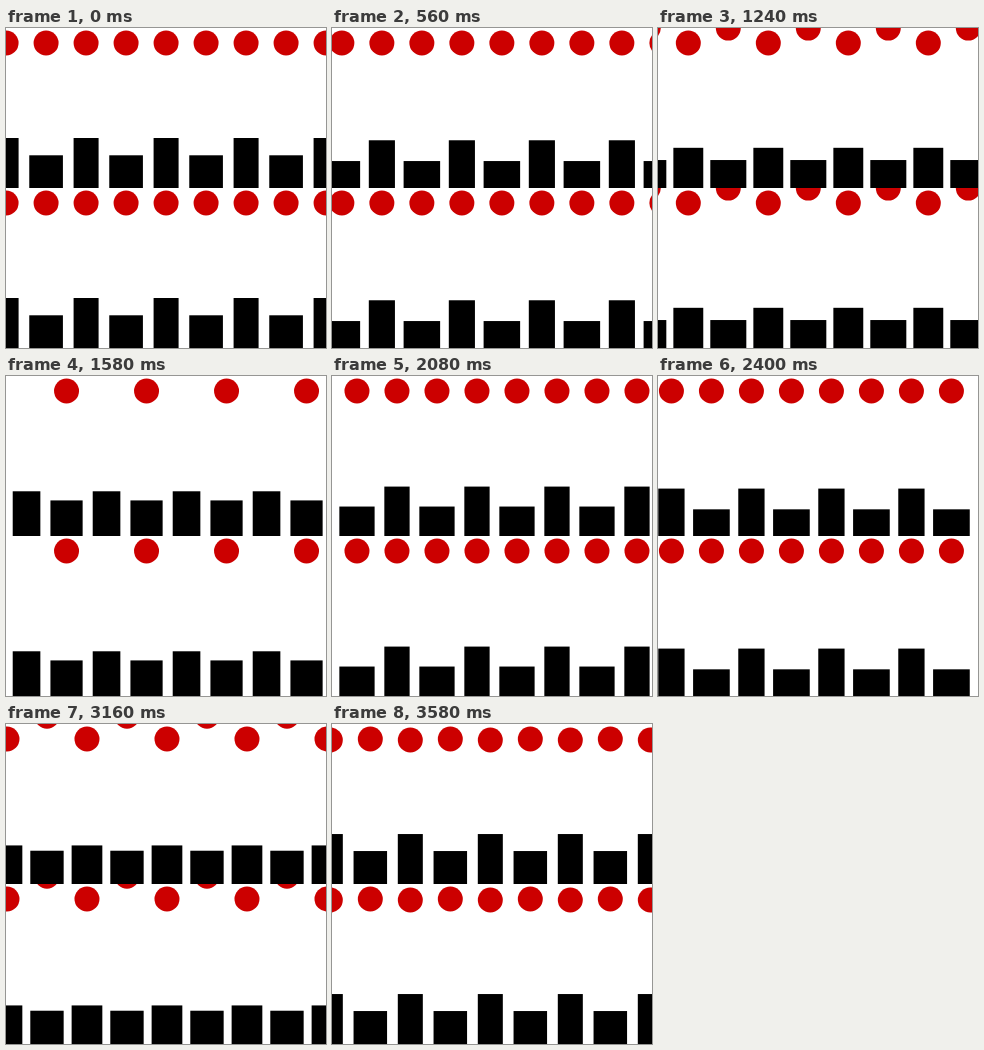
An HTML page with a canvas for the animation above (3600 ms loop, 320x320 px).

```html
<!DOCTYPE html>
<html lang="en">
<head>
<meta charset="utf-8">
<title>Bouncing balls</title>
<style>
  html, body { margin: 0; width: 100%; height: 100%; overflow: hidden; background: #fff; }
  canvas { display: block; width: 320px; height: 320px; }
</style>
</head>
<body>
<canvas id="stage" width="320" height="320"></canvas>
<script>
const ctx = document.getElementById('stage').getContext('2d');
const SIZE = 320, ROW = 160, GAP = 40, LOOP = 3600;
const RADIUS = 12.5, REST_Y = 15;
const PRESS_END = 0.8, SINK_START = 0.75, LAUNCH = 0.94, SINK = 30;

const ease = u => (1 - Math.cos(Math.PI * u)) / 2;

// Slow squash, then a quick stretch
function barHeight(p) {
  return p < PRESS_END
    ? 50 - 25 * ease(p / PRESS_END)
    : 25 + 25 * ease((p - PRESS_END) / (1 - PRESS_END));
}

// The ball slips up into the bar above, then is shot to that row's ceiling
function ballRise(p) {
  if (p < SINK_START) return 0;
  if (p < LAUNCH) return SINK * ease((p - SINK_START) / (LAUNCH - SINK_START));
  const left = (1 - p) / (1 - LAUNCH);
  return ROW - (ROW - SINK) * left * left;
}

function eachColumn(t, draw) {
  const shift = (t * SIZE) % (2 * GAP);
  for (let i = -3; i <= 9; i++) {
    const phase = (t + (i % 2 ? 0.5 : 0)) % 1;
    draw(i * GAP + shift, phase);
  }
}

function render(t) {
  ctx.fillStyle = '#fff';
  ctx.fillRect(0, 0, SIZE, SIZE);

  ctx.fillStyle = '#c00';
  eachColumn(t, (x, p) => {
    const y = REST_Y - ballRise(p);
    for (let row = 0; row < 3; row++) {
      ctx.beginPath();
      ctx.arc(x, y + row * ROW, RADIUS, 0, Math.PI * 2);
      ctx.fill();
    }
  });

  ctx.fillStyle = '#000';
  eachColumn(t, (x, p) => {
    const h = barHeight(p), w = 50 - h / 2;
    for (let row = 1; row < 3; row++) ctx.fillRect(x - w / 2, row * ROW - h, w, h);
  });
}

const start = performance.now();
function tick() {
  render(((performance.now() - start) % LOOP) / LOOP);
  requestAnimationFrame(tick);
}
tick();
</script>
</body>
</html>
```
